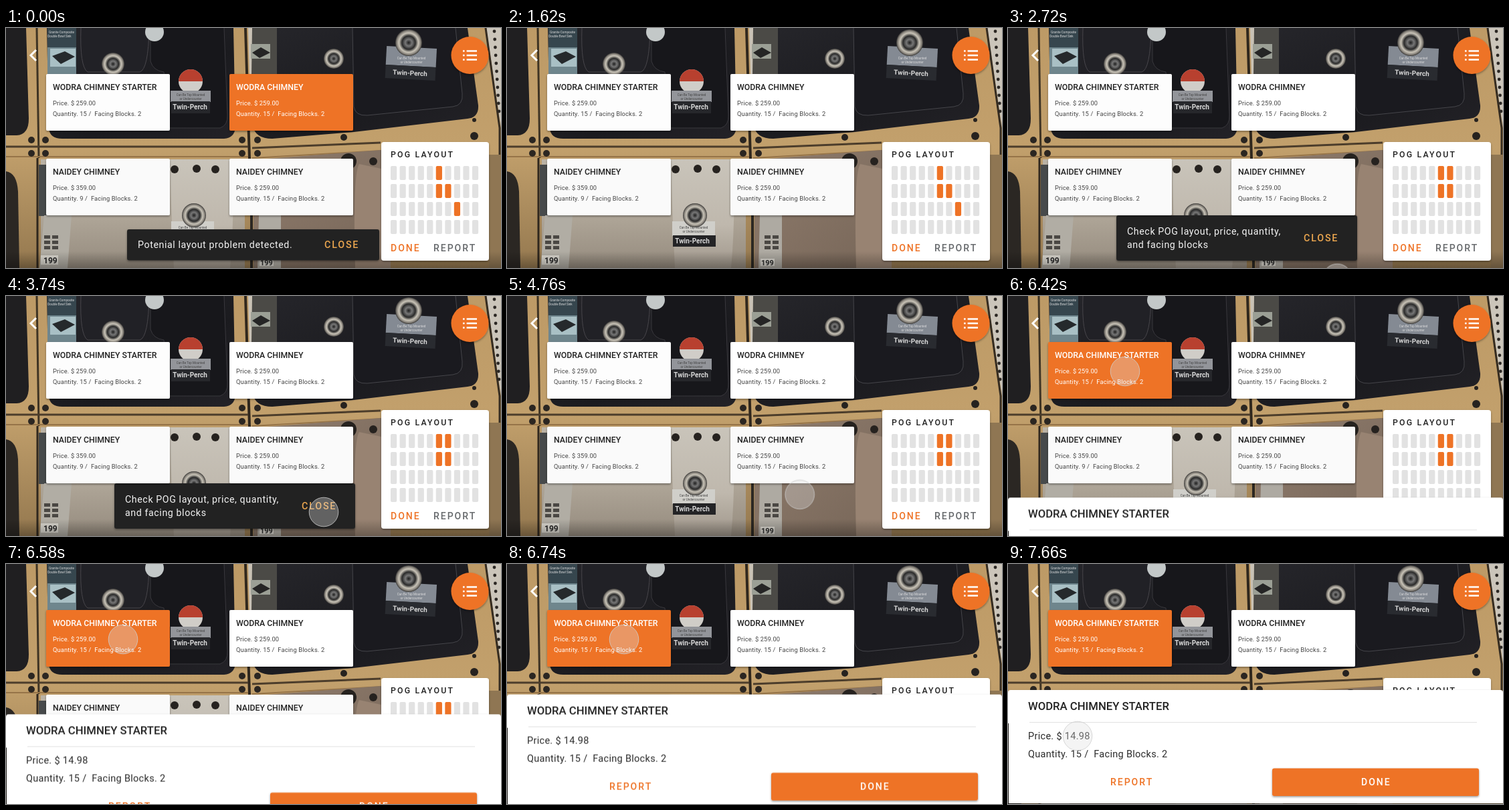
Write an HTML page that moves like this. It is 740x360 px and loops after 8000 ms.

```html
<!DOCTYPE html>
<html lang="en">
<head>
<meta charset="utf-8">
<title>Shelf check</title>
<style>
  html, body { margin: 0; width: 100%; height: 100%; overflow: hidden; background: #222; }
  svg { display: block; width: 740px; height: 360px; }
  text { font-family: Roboto, Inter, sans-serif; white-space: pre; }
  .title { font-size: 12.3px; font-weight: 500; }
  .small { font-size: 9.3px; letter-spacing: .15px; }
  .body { font-size: 14.2px; letter-spacing: .6px; fill: #f4f4f4; }
  .button { font-size: 14px; font-weight: 500; letter-spacing: 2px; }
  .close { font-size: 14.3px; font-weight: 500; letter-spacing: 1.8px; fill: #eba64f; }
  .heading { font-size: 16.7px; font-weight: 500; fill: #222; }
  .detail { font-size: 14.5px; letter-spacing: .3px; fill: #2b2b2b; }
  .tag { font-size: 10px; font-weight: 700; fill: #d8d8d8; text-anchor: middle; }
  .tiny { font-size: 4.6px; fill: #444; text-anchor: middle; }
  .pale { fill: #ddd; }
</style>
</head>
<body>
<svg viewBox="0 0 740 360">
  <defs>
    <linearGradient id="wood" x2="0" y2="1">
      <stop offset="0" stop-color="#bd9a66"/><stop offset=".5" stop-color="#c2a06c"/><stop offset="1" stop-color="#94784f"/>
    </linearGradient>
    <linearGradient id="black" x2="1" y2="1">
      <stop offset="0" stop-color="#26262b"/><stop offset=".6" stop-color="#1b1b1f"/><stop offset="1" stop-color="#232227"/>
    </linearGradient>
    <linearGradient id="cream" x2="0" y2="1">
      <stop offset="0" stop-color="#bbb3a6"/><stop offset=".5" stop-color="#b0a799"/><stop offset="1" stop-color="#958b7e"/>
    </linearGradient>
    <linearGradient id="basin" x2="0" y2="1">
      <stop offset="0" stop-color="#c9c4ba"/><stop offset=".6" stop-color="#bfb8ad"/><stop offset="1" stop-color="#a0978b"/>
    </linearGradient>
    <linearGradient id="taupe" x2="1" y2="1">
      <stop offset="0" stop-color="#8f7c6d"/><stop offset="1" stop-color="#776658"/>
    </linearGradient>
    <linearGradient id="dusk" x2="0" y2="1">
      <stop offset="0" stop-opacity="0"/><stop offset="1" stop-opacity=".3"/>
    </linearGradient>
    <radialGradient id="steel">
      <stop offset="0" stop-color="#1d1d1d"/><stop offset=".25" stop-color="#777"/>
      <stop offset=".5" stop-color="#2a2a2a"/><stop offset=".72" stop-color="#c9c4b8"/>
      <stop offset=".88" stop-color="#8d8880"/><stop offset="1" stop-color="#3b3a38"/>
    </radialGradient>
    <filter id="soft" x="0" y="0" width="1" height="1"><feGaussianBlur stdDeviation=".7"/></filter>
    <filter id="shadow" x="-10%" y="-20%" width="120%" height="150%">
      <feDropShadow dx="0" dy="1.5" stdDeviation="1.6" flood-opacity=".4"/>
    </filter>
  </defs>

  <g id="photo">
    <g filter="url(#soft)">
      <rect width="740" height="360" fill="url(#wood)"/>
      <!-- upper row -->
      <path d="M0 0H30L34 136Q34 160 16 161H0Z" fill="#201f21"/>
      <path d="M46 0L49 195" stroke="#3f3424" stroke-width="3"/>
      <path d="M61 0H340L343 148Q342 165 326 166H84Q65 166 64 150Z" fill="url(#black)"/>
      <path d="M112 0Q110 58 122 66H200Q213 62 214 0" fill="#212126" stroke="#48464b"/>
      <path d="M216 0V50Q220 64 236 66L243 150H320Q332 146 331 130L326 0" fill="#17171b" stroke="#39383d"/>
      <path d="M358 0L364 196" stroke="#2f271d" stroke-width="4"/>
      <path d="M366 0H690L706 116Q707 134 690 136L520 156L398 166Q372 166 369 146Z" fill="url(#black)"/>
      <path d="M518 0L520 118Q522 132 540 131L668 118Q684 116 682 98L672 0" fill="#1a1a1f" stroke="#45454a"/>
      <path d="M718 0H740V150Z" fill="#cbc5ba"/>
      <path d="M717 0L738 150V190" fill="none" stroke="#352c21" stroke-width="3"/>
      <rect x="62" width="43" height="70" fill="#6f868d"/>
      <rect x="62" width="43" height="29" fill="#36464e"/>
      <rect x="66" y="31" width="38" height="27" fill="#a9c0c5"/>
      <path d="M69 42L88 35L103 43L82 54Z" fill="#25292c"/>
      <rect x="366" width="39" height="70" fill="#4b4a46"/>
      <path d="M362 0H368L367 70H364Z" fill="#c9c2b5"/>
      <rect x="366" y="24" width="29" height="22" fill="#9b9f95"/>
      <path d="M368 37L381 29L395 37L379 45Z" fill="#252525"/>
      <circle cx="222" cy="6" r="14" fill="#c3c8c8"/>
      <circle cx="276" cy="80" r="18" fill="#d0cdc8"/>
      <path d="M258 80A18 18 0 0 1 294 80Z" fill="#b8402f"/>
      <rect x="246" y="94" width="60" height="17" fill="#93959a"/>
      <rect x="247" y="110" width="58" height="18" fill="#26272b"/>
      <g transform="rotate(3 605 50)">
        <rect x="568" y="29" width="75" height="28" fill="#848a93"/>
        <rect x="568" y="57" width="75" height="20" fill="#292b30"/>
      </g>
      <!-- rail between the rows -->
      <path d="M0 178H362M368 180L560 172" stroke="#4c3d2b" stroke-width="3"/>
      <path d="M0 193H362M368 195L560 184" stroke="#967448" stroke-width="2"/>
      <!-- lower row -->
      <path d="M0 215Q16 217 18 245L20 360H0Z" fill="#2b2723"/>
      <path d="M47 195V360" stroke="#2f271e" stroke-width="3"/>
      <path d="M52 197H342Q356 199 357 214V360H52Z" fill="url(#cream)"/>
      <path d="M245 197Q247 280 251 360H335Q342 282 338 197Z" fill="url(#basin)"/>
      <path d="M49 205H62V282H49Z" fill="#474a4b"/>
      <path d="M57 281H98L92 360H50Z" fill="#b1ada4"/>
      <path d="M367 196V360" stroke="#2c2823" stroke-width="4"/>
      <path d="M370 208Q371 198 390 196L575 182V360H370Z" fill="url(#taupe)"/>
      <path d="M528 204Q518 220 522 360H575V214Z" fill="#988372"/>
      <path d="M378 281H411V360H376Z" fill="#aeaaa2"/>
      <rect x="722" y="190" width="18" height="170" fill="#8f7653"/>
      <path d="M52 341H78V355H52ZM379 346H400V357H379Z" fill="#d9d6ce"/>
      <rect x="247" y="290" width="64" height="22" fill="#d0cfca"/>
      <rect x="248" y="311" width="64" height="17" fill="#242426"/>
      <rect y="335" width="740" height="25" fill="url(#dusk)"/>
      <g id="spots"></g>
    </g>
    <text class="tag" x="275" y="122">Twin-Perch</text>
    <text class="tag" x="605" y="71" transform="rotate(3 605 50)">Twin-Perch</text>
    <text class="tag" x="277" y="323">Twin-Perch</text>
    <text class="tiny pale" x="83" y="8">Granite Composite</text>
    <text class="tiny pale" x="80" y="14">Double Bowl Sink</text>
    <text class="tiny" x="276" y="102">Can Be Top Mounted</text>
    <text class="tiny" x="276" y="108">or Undercounter</text>
    <text class="tiny pale" x="606" y="47">Can Be Top Mounted</text>
    <text class="tiny pale" x="606" y="53">or Undercounter</text>
    <text class="tiny" x="279" y="301">Can Be Top Mounted</text>
    <text class="tiny" x="279" y="307">or Undercounter</text>
    <text x="56" y="353" font-size="12" font-weight="700" fill="#222">199</text>
    <text x="380" y="356" font-size="11" font-weight="700" fill="#222">199</text>
  </g>

  <g id="problem">
    <rect x="181" y="302" width="377" height="46.5" rx="3" fill="#232323" filter="url(#shadow)"/>
    <text class="body" x="197" y="330">Potenial layout problem detected.</text>
    <text class="close" x="476" y="330">CLOSE</text>
  </g>
  <g id="advice">
    <rect x="162" y="281" width="360" height="68" rx="3" fill="#232323" filter="url(#shadow)"/>
    <text class="body" x="178" y="310">Check POG layout, price, quantity,</text>
    <text class="body" x="178" y="330">and facing blocks</text>
    <text class="close" x="442" y="320">CLOSE</text>
  </g>

  <g id="cards"></g>

  <g id="panel">
    <rect x="561" y="171" width="161" height="178" rx="4" fill="#fff" filter="url(#shadow)"/>
    <text x="575" y="194" font-size="12.3" font-weight="500" letter-spacing="2.2" fill="#222">POG LAYOUT</text>
    <g id="cells"></g>
    <text class="button" x="575" y="335" fill="#ee7326">DONE</text>
    <text class="button" x="639" y="335" fill="#66696c">REPORT</text>
  </g>

  <path d="M45 33L37 41L45 49" fill="none" stroke="#fff" stroke-width="3"/>
  <circle cx="693.5" cy="41" r="28" fill="#ee7326" filter="url(#shadow)"/>
  <path d="M683 34.5h2.6m3 0h15.4M683 41h2.6m3 0h15.4M683 47.5h2.6m3 0h15.4" stroke="#fff" stroke-width="2.3"/>

  <g id="sheet">
    <path d="M0 50V4Q0 0 4 0H736Q740 0 740 4V170H1V50Z" fill="#fff" filter="url(#shadow)"/>
    <text class="heading" x="30" y="30">WODRA CHIMNEY STARTER</text>
    <path d="M32 48.5H701" stroke="#e1e1e1"/>
    <text class="detail" x="30" y="73.5">Price. $ 14.98</text>
    <text class="detail" x="30" y="100.5">Quantity. 15 /  Facing Blocks. 2</text>
    <text class="button" x="153" y="143" fill="#ee7326">REPORT</text>
    <rect x="395" y="117.5" width="309" height="41.5" rx="3" fill="#ee7326" filter="url(#shadow)"/>
    <text class="button" x="528" y="143" fill="#fff">DONE</text>
  </g>

  <circle id="touch" r="21.8" fill="rgba(222,222,222,.34)" stroke="rgba(205,205,205,.8)"/>
</svg>
<script>
const LOOP = 8000, ORANGE = '#ee7326', GREY = '#e2e2e2';
const $ = id => document.getElementById(id);

function add(parent, tag, attrs, content = '') {
  const node = document.createElementNS('http://www.w3.org/2000/svg', tag);
  for (const key in attrs) node.setAttribute(key, attrs[key]);
  node.textContent = content;
  return parent.appendChild(node);
}

// steps: [ms, properties, easing towards the next step]
function track(node, steps) {
  const first = steps[0], last = steps[steps.length - 1];
  const frames = [[0, first[1]], ...steps, [LOOP, last[1]]].map(([ms, props, easing = 'linear']) =>
    ({ offset: ms / LOOP, easing, ...props }));
  node.animate(frames, { duration: LOOP, iterations: Infinity });
}
const at = (x, y) => ({ transform: `translate(${x}px, ${y}px)` });
const fade = (node, prop, start, end, from, to) =>
  track(node, [[start, { [prop]: from }], [end, { [prop]: to }]]);

// drains, bolts, tap holes, pegboard and printed codes
const spot = (cx, cy, r, fill) => add($('spots'), 'circle', { cx, cy, r, fill });
for (const [x, y, r] of [[160, 54, 17], [602, 22, 20], [490, 46, 15], [281, 281, 18]])
  spot(x, y, r, 'url(#steel)');
for (const x of [38, 59, 353, 376])
  for (const y of [168, 188]) spot(x, y, 5, '#2b2621');
for (const [x, y, r] of [[700, 138, 3], [700, 162, 6], [505, 164, 5], [252, 212, 6], [285, 211, 6], [313, 212, 6], [512, 200, 12], [549, 200, 6]])
  spot(x, y, r, '#26221f');
for (let i = 0; i < 11; i++) spot(730 + i * .7, 5 + i * 12, 2.4, '#2b2723');
for (const x of [57, 385])
  for (let i = 0; i < 6; i++)
    add($('spots'), 'rect', { x: x + i % 2 * 12, y: 311 + (i >> 1) * 8, width: 9, height: 5, fill: '#4a4743' });

function card(x, y, title, price, quantity, paper) {
  const g = add($('cards'), 'g', { transform: `translate(${x} ${y})` });
  const rect = add(g, 'rect', { width: 185, height: 85, rx: 2, fill: paper, filter: 'url(#shadow)' });
  const texts = [
    add(g, 'text', { class: 'title', x: 10, y: 24, fill: '#222' }, title),
    add(g, 'text', { class: 'small', x: 10, y: 46.5, fill: '#444' }, `Price. $ ${price}.00`),
    add(g, 'text', { class: 'small', x: 10, y: 62.5, fill: '#444' }, `Quantity. ${quantity} /  Facing Blocks. 2`)
  ];
  return { rect, texts };
}
const starter = card(60, 69, 'WODRA CHIMNEY STARTER', 259, 15, '#fdfdfd');
const chimney = card(334, 69, 'WODRA CHIMNEY', 259, 15, '#fff');
card(60, 196, 'NAIDEY CHIMNEY', 359, 9, '#fafafa');
card(334, 196, 'NAIDEY CHIMNEY', 259, 15, '#fafafa');

const cells = [];
for (let i = 0; i < 40; i++)
  cells.push(add($('cells'), 'rect', {
    x: 575 + i % 10 * 13.55, y: 207 + Math.floor(i / 10) * 27, width: 9.2, height: 21, rx: 2,
    fill: [5, 15, 16].includes(i) ? ORANGE : GREY
  }));

fade(chimney.rect, 'fill', 1020, 1320, ORANGE, '#fff');
chimney.texts.forEach((t, i) => fade(t, 'fill', 1020, 1320, '#fff', i ? '#444' : '#222'));
fade($('problem'), 'opacity', 1020, 1360, 1, 0);
fade(cells[27], 'fill', 1660, 1820, ORANGE, GREY);
fade(cells[6], 'fill', 1840, 2040, GREY, ORANGE);

track($('advice'), [
  [1840, { ...at(0, 82), opacity: 1 }, 'ease-out'],
  [2160, { ...at(0, 0), opacity: 1 }],
  [3740, { ...at(0, 0), opacity: 1 }],
  [4080, { ...at(0, 0), opacity: 0 }]
]);

fade(starter.rect, 'fill', 6280, 6420, '#fdfdfd', ORANGE);
starter.texts.forEach((t, i) => fade(t, 'fill', 6280, 6420, i ? '#444' : '#222', '#fff'));
track($('sheet'), [
  [6289, { ...at(0, 360), opacity: 0 }],
  [6290, { ...at(0, 360), opacity: 1 }, 'ease'],
  [6890, { ...at(0, 189), opacity: 1 }]
]);

// the last reach swings out in an arc
const curve = (a, b, c, d, t) =>
  a * (1 - t) ** 3 + 3 * b * t * (1 - t) ** 2 + 3 * c * t * t * (1 - t) + d * t ** 3;
const arc = Array.from({ length: 25 }, (_, i) => {
  const u = i / 24, t = u < .5 ? 2 * u * u : 1 - 2 * (1 - u) ** 2;
  return [6820 + 840 * u, at(curve(175, 198, 188, 104, t), curve(113, 200, 348, 258, t))];
});
track($('touch'), [
  [2560, at(495, 384), 'ease-in-out'],
  [3180, at(475, 324)],
  [4540, at(475, 324), 'ease-in-out'],
  [5440, at(175, 113)],
  ...arc
]);
</script>
</body>
</html>
```
